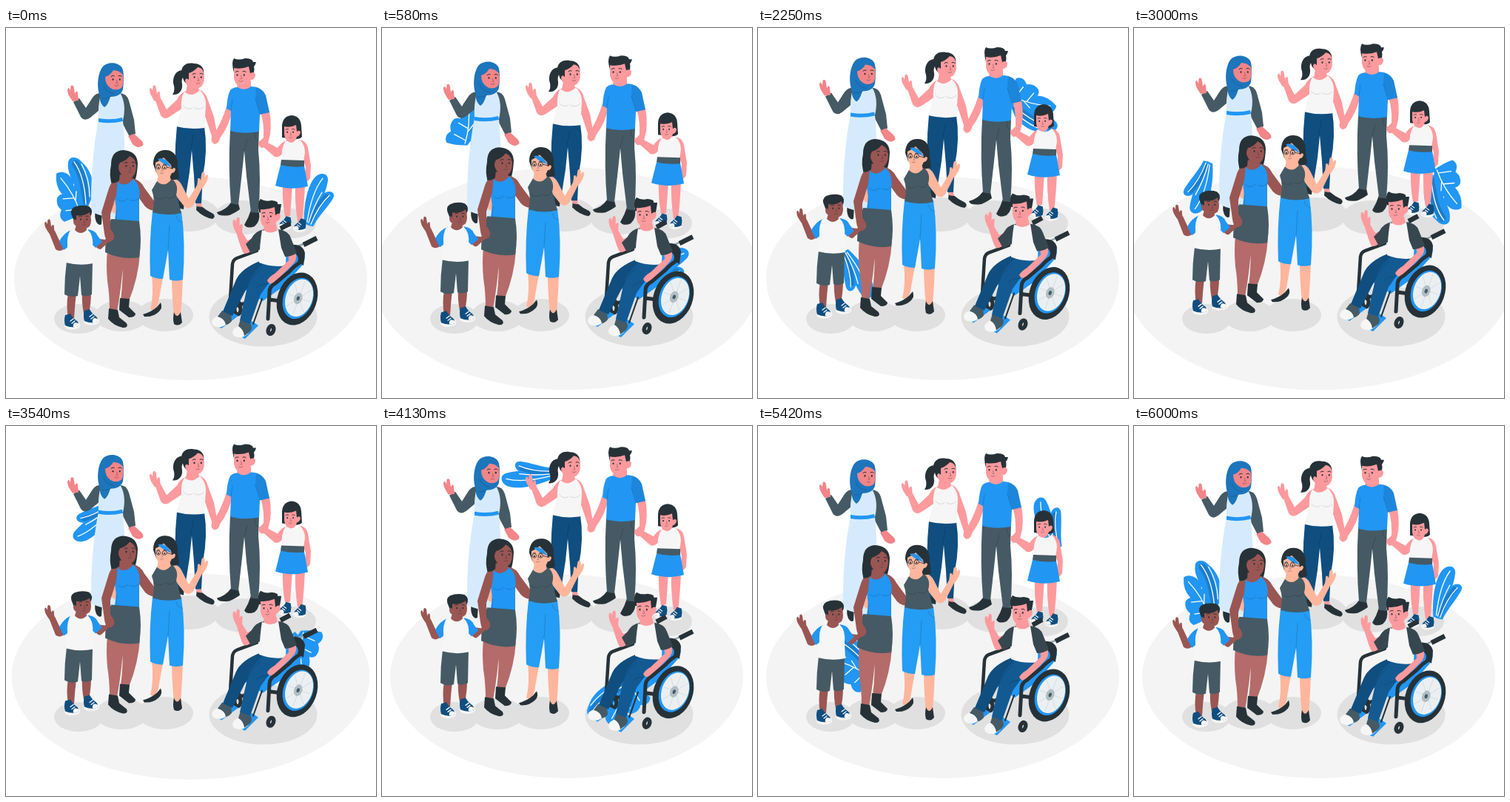
Animation, 500 px wide and 500 px high, one loop 6040 ms. Source, as an HTML page:

```html
<!DOCTYPE html>
<html lang="en">
<head>
<meta charset="utf-8">
<title>Community</title>
<style>
  html, body { margin: 0; width: 100%; height: 100%; overflow: hidden; background: #fff; }
  svg { display: block; width: 100vw; height: 100vh; }
  .blue { fill: #2196f3; } .sky { fill: #249df4; } .deep { fill: #1d75bb; } .navy { fill: #104e80; } .pale { fill: #d5ebfd; }
  .dark { fill: #263238; } .grey { fill: #455a64; } .slate { fill: #37474f; } .white { fill: #f6f6f6; }
  .rose { fill: #f28588; } .pink { fill: #fd9a9d; } .peach { fill: #ffb69c; }
  .brown { fill: #9a5653; } .leg { fill: #b46b69; } .shade { fill: #e0e0e0; }
  .line { fill: none; stroke: #263238; stroke-linecap: round; stroke-linejoin: round; }
  .vein { fill: none; stroke: #fff; stroke-width: 1.3; stroke-linecap: round; }
  .fold { fill: none; stroke: #000; stroke-opacity: .16; stroke-linecap: round; }
</style>
</head>
<body>
<svg viewBox="0 0 500 500">
  <defs>
    <path id="hand" d="M-5 1C-8 -4 -12 -8 -12 -15C-11 -18 -9 -17 -8 -13L-7.500 -19C-6 -22 -3 -20 -3 -16L-2 -9C-1 -13 2 -13 2 -10C2 -6 3 -4 3 0Z"/>
    <g id="face" stroke="#263238" fill="none" stroke-linecap="round">
      <path stroke-width="1" d="M-7 -5.500q2.200 -2 4.200 -.8M3 -6.300q2.500 -1.200 4.300 .6"/>
      <path stroke-width="2.100" d="M-4.500 -1.800v.5M4.800 -1.800v.5"/>
      <path stroke-width=".8" stroke-opacity=".5" d="M.5 -.5l1.200 4l-1.800 .2M-2 6.800q2.500 1.600 5 -.4"/>
    </g>
    <g id="shoe">
      <path class="white" d="M-10 7Q-9 3 -4 2L10 3Q13 9 8 11Q-2 15 -9 10Z"/>
      <path class="navy" d="M-9 -7L-2 -9Q1 -3 7 1Q10 4 9 8Q0 11 -9 7Q-11 0 -9 -7Z"/>
      <path class="white" d="M4 3Q10 3 10 7Q7 10 2 9Q1 5 4 3Z"/>
      <path class="vein" stroke-width=".8" d="M-2 1l4 -3M0 4l4 -3"/>
    </g>
  </defs>

  <ellipse id="floor" rx="238.500" ry="137.500" fill="#f4f4f4"/>
  <g class="shade">
    <ellipse cx="247" cy="252" rx="41" ry="23"/>
    <ellipse cx="320" cy="256" rx="39" ry="23"/>
    <ellipse cx="386" cy="264" rx="33" ry="20"/>
    <ellipse cx="98" cy="393" rx="33" ry="20"/>
    <ellipse cx="156" cy="389" rx="36" ry="21"/>
    <ellipse cx="215" cy="388" rx="38" ry="22"/>
    <ellipse cx="347.500" cy="390" rx="73" ry="40.500"/>
  </g>

  <g id="plants">
    <path class="blue" d="M84 183C84 173 96 173 102 181C113 190 120 206 118 225L110 244L98 240C97 226 94 216 89 205C85 196 83 190 84 183Z"/>
    <path class="fold" stroke-width="10" d="M94 184Q107 203 107 234"/>
    <path class="vein" d="M92 181Q106 200 108 238M102 184Q113 204 113 228"/>
    <path class="blue" d="M68 197C75 192 85 196 90 205Q92 209 91 213Q99 214 102 224Q105 236 104 249Q92 258 79 262Q70 257 75 246Q67 240 69 230Q72 225 76 225Q66 214 68 197Z"/>
    <path class="vein" d="M74 203Q92 224 100 249M94 234L95 221M91 230L77 231M98 245L81 247"/>
    <path class="blue" d="M403 264C402 243 406 215 417 202C424 194 436 195 435 206C432 226 420 245 412 267Z"/>
    <path class="blue" d="M407 266C408 250 418 230 430 223C438 218 446 222 442 230C434 243 424 252 415 268Z"/>
    <path class="fold" stroke-width="7" d="M412 260Q420 240 433 228"/>
    <path class="vein" d="M428 203Q413 222 407 262M437 226Q422 240 412 265M427 222Q416 240 409 263"/>
  </g>

  <!-- woman in a long dress -->
  <g class="low">
    <path class="dark" d="M121 247L130 247L129 265Q126 268 122 262Q119 255 121 247Z"/>
    <path class="grey" d="M91 100L99 95L108 108L117 94Q122 87 131 88L132 106L114 121Q106 127 101 120Z"/>
    <use href="#hand" x="95" y="98" class="rose"/>
    <path class="grey" d="M153 88Q163 88 166 98L173 124L175 143L167 147L157 128Z"/>
    <path class="rose" d="M165 146L173 143L183 152Q188 158 183 160Q178 163 171 157Z"/>
    <path class="pale" d="M128 90Q145 84 155 89Q163 104 158 125Q163 180 160 256Q134 258 115 248Q114 180 125 124Q124 104 128 90Z"/>
    <path class="blue" d="M125 122Q143 125 157 121L158 126Q141 130 125 127Z"/>
    <path class="deep" d="M127 92C122 80 124 60 131 52C138 45 152 46 157 54C160 60 159 75 158 83C156 90 149 93 141 93C139 99 137 105 133 107C129 104 126 98 127 92Z"/>
    <path class="rose" d="M134 66Q141 64 145 57Q153 57 158 63Q160 75 156 81Q148 86 141 81Q134 76 134 66Z"/>
    <path class="fold" d="M132 78Q135 87 146 89M130 95Q137 96 142 92"/>
    <use href="#face" x="149" y="71"/>
  </g>

  <!-- woman with ponytail -->
  <g class="high">
    <path class="dark" d="M232 225L242 225L240 245L231 243Z"/>
    <path class="dark" d="M258 237L263 240Q271 247 280 251Q284 255 279 258Q267 256 257 246Z"/>
    <path class="pink" d="M256 232L263 232L265 242L258 241Z"/>
    <path class="pink" d="M244 85Q236 87 231 97L217 110L209 95L202 98L209 118Q214 125 221 120L242 106Z"/>
    <use href="#hand" x="206" y="98" class="pink"/>
    <path class="pink" d="M260 83Q270 86 273 98L281 120L286 147Q288 156 282 157Q277 155 278 146L270 122L262 104Z"/>
    <path class="navy" d="M231 132L268 133Q273 165 266 200L264 237L256 237L254 200L251 165L248 195L242 233L231 236Q226 180 231 132Z"/>
    <path class="fold" d="M250 163L253 144M262 139Q267 140 268 147"/>
    <path class="pink" d="M245 76L260 78L261 90Q252 96 243 87Z"/>
    <path class="white" d="M241 86Q251 95 262 84Q271 93 270 105L268 135Q249 138 230 133L237 110Q236 94 241 86Z"/>
    <path class="fold" stroke-width=".8" d="M240 106Q246 112 252 108M255 108Q262 112 268 106"/>
    <path class="dark" d="M239 57C228 57 224 69 227 78C228 84 227 87 225 90C234 91 239 84 238 76C237 70 238 67 242 64Z"/>
    <path class="dark" d="M237 62C236 50 245 46 254 48C264 48 269 55 267 64L257 60L247 77Q240 74 239 67Z"/>
    <path class="pink" d="M247 61Q255 58 259 53Q266 54 267 60Q270 72 264 79Q257 85 249 78Q243 79 242 71Q243 66 247 70Z"/>
    <use href="#face" x="259" y="68"/>
  </g>

  <!-- tall man -->
  <g class="high">
    <path class="dark" d="M304 236L314 237L316 245Q311 249 302 253Q286 255 285 249Q297 246 304 236Z"/>
    <path class="dark" d="M331 246L342 249Q344 261 336 268Q326 272 322 266Q328 256 331 246Z"/>
    <path class="pink" d="M298 106L306 110Q302 132 289 149Q288 157 281 156Q275 153 279 147Q291 129 298 106Z"/>
    <path class="pink" d="M344 113L356 112Q360 136 355 152Q353 162 345 162Q339 158 344 152L348 148Q349 130 344 113Z"/>
    <path class="grey" d="M303 137L342 138L341 165Q345 205 341 250L331 249L325 200L322 166L319 195L314 239L304 237Q300 190 303 137Z"/>
    <path class="fold" d="M322 166L326 151M336 142Q336 151 341 153"/>
    <path class="pink" d="M313 70L331 72L331 83Q321 89 312 82Z"/>
    <path class="blue" d="M303 84Q307 80 313 80Q322 86 331 79Q345 79 351 91L356 114L343 117L342 140Q320 144 303 139L304 112L298 109Q299 92 303 84Z"/>
    <path class="fold" d="M343 116L337 96M304 112L306 97"/>
    <path d="M338 80Q348 82 351 91L356 114L344 117L337 96Z" opacity=".1"/>
    <path class="dark" d="M308 60Q304 46 308 41Q314 44 323 41Q333 41 334 46L338 46Q337 50 335 52Q337 60 331 68L324 64Z"/>
    <path class="pink" d="M308 54Q318 56 328 52L330 61Q337 58 337 64Q336 70 331 70Q329 80 319 80Q310 78 308 68Z"/>
    <use href="#face" x="317" y="65"/>
  </g>

  <!-- girl in a skirt -->
  <g class="high">
    <path class="pink" d="M374 210L387 212L384 254L377 255Q373 232 374 210ZM391 212L404 211Q403 238 400 262L394 261Q390 236 391 212Z"/>
    <use href="#shoe" transform="translate(377 262) scale(-.85 .85)"/>
    <use href="#shoe" transform="translate(397 265) scale(-.85 .85)"/>
    <path class="pink" d="M381 151Q372 154 367 162L352 154Q346 149 341 154Q340 160 348 161L363 174Q369 176 375 168Z"/>
    <path class="pink" d="M396 151Q406 152 408 162L412 186L411 203Q407 210 403 206L405 188L399 170Z"/>
    <path class="white" d="M378 152Q388 159 397 151Q404 158 404 168L402 181L373 179Q371 163 378 152Z"/>
    <path class="blue" d="M371 185L403 186L408 214Q386 220 364 213Z"/>
    <path class="grey" d="M372 178L403 179L403 187Q386 189 371 185Z"/>
    <path class="dark" d="M373 132Q374 119 386 118Q398 119 399 132L400 147Q396 151 388 150L373 148Z"/>
    <path class="pink" d="M376 133Q384 135 392 131L393 140Q397 137 398 141Q397 146 393 147Q391 155 385 155Q377 153 376 144Z"/>
    <use href="#face" transform="translate(384 142) scale(.85)"/>
  </g>

  <!-- man in wheelchair -->
  <g class="low">
    <g class="line">
      <path stroke="#90a4ae" stroke-width="2.500" d="M382 300L404 291M363 277L373 271"/>
      <path stroke-width="6.500" d="M402 293L420 284M371 271L384 264" stroke-linecap="butt"/>
      <ellipse cx="323" cy="357" rx="9" ry="17" stroke-width="5" transform="rotate(20 323 357)"/>
      <ellipse cx="313" cy="380" rx="4" ry="7" stroke-width="5"/>
    </g>
    <path class="blue" d="M383 294L402 302Q407 311 400 321L374 350L347 369L318 350L340 320Z"/>
    <path class="dark" d="M384 293Q401 291 404 304L402 321L394 316Q398 306 384 302Z"/>
    <path class="blue" d="M279 396L303 383L314 389L291 406ZM308 413L332 396L341 402L323 420Z"/>
    <path class="line" stroke="#90a4ae" stroke-width="2" d="M346 366L334 400"/>
    <path class="line" stroke-width="4.500" d="M339 301L312 311Q307 313 306 319L303 367L316 377"/>
    <path class="white" d="M278 397Q279 391 288 389L302 394Q300 401 291 404Q278 405 278 397ZM306 411Q307 405 316 402L331 406Q329 414 319 418Q306 419 306 411Z"/>
    <path class="grey" d="M292 382L304 385L305 396Q301 401 297 401Q296 393 286 390ZM317 393L329 398Q335 405 329 411L322 416Q321 407 314 403Z"/>
    <path class="navy" d="M343 315L366 321Q357 338 336 338L323 356L306 389L293 383L311 340Q318 325 343 315Z"/>
    <path d="M349 317L379 318Q380 336 354 346L344 360L330 400L316 395L326 350Q329 334 349 317Z" fill="#135a93"/>
    <path class="fold" d="M326 350Q330 337 344 326M354 346Q344 345 339 351"/>
    <path class="pink" d="M311 276L318 274L326 287L336 284L335 299Q325 307 321 304Q318 300 311 276Z"/>
    <use href="#hand" transform="translate(316 277) rotate(10)" class="pink"/>
    <path class="slate" d="M349 272Q337 274 332 284L324 292L331 305L346 298Z"/>
    <path class="white" d="M346 273Q358 279 370 271Q380 289 378 321Q360 324 342 317Q343 290 346 273Z"/>
    <path class="pink" d="M381 304L391 303Q395 313 386 321L364 343Q356 349 353 341Q357 335 363 332L382 314Z"/>
    <path class="slate" d="M368 272Q382 274 385 284L393 304Q386 309 377 309L372 297Z"/>
    <path class="pink" d="M349 264L365 265L367 273Q357 280 348 273Z"/>
    <path class="dark" d="M342 249Q339 236 344 231Q350 235 359 233Q369 234 367 238L372 238Q370 256 366 259L360 254Z"/>
    <path class="pink" d="M344 245Q353 246 363 242L364 253Q370 248 371 254Q370 260 366 261Q363 271 354 271Q345 269 344 259Z"/>
    <use href="#face" x="353" y="256"/>
    <path class="line" stroke-width="5" d="M399 316Q391 320 383 329L364 345Q356 349 356 357L354 393M356 367L379 370"/>
    <ellipse class="line" cx="358" cy="408" rx="3.500" ry="5.500" stroke-width="5.500" transform="rotate(20 358 408)"/>
    <g transform="translate(393.500 366) rotate(20)">
      <ellipse class="dark" rx="26.500" ry="36.500"/>
      <ellipse cx="1" cy="-1" rx="20" ry="28.500" class="blue"/>
      <ellipse cx="2" cy="-2" rx="18" ry="26" fill="#eceff1"/>
      <path d="M-14 -2H18M2 -26V22M-10 -18L14 14M-10 14L14 -18" stroke="#cfd8dc" stroke-width=".7"/>
      <ellipse cx="1" cy="-1" rx="5.500" ry="8" fill="#b0bec5"/>
      <ellipse cx="1" cy="-1" rx="2" ry="3" class="grey"/>
    </g>
  </g>

  <!-- two women -->
  <g class="high">
    <path class="peach" d="M150 232Q142 236 142 245Q145 253 152 250Z"/>
    <path class="leg" d="M137 300L159 306Q157 345 150 383L140 382Q140 360 137 342Q135 320 137 300ZM157 306L181 304Q179 337 166 369L155 368Q159 337 157 306Z"/>
    <path class="dark" d="M139 379L151 381L153 391L163 399Q166 405 158 405Q145 402 138 393ZM154 365L167 366L166 377L175 386Q175 391 166 391L153 381Z"/>
    <path class="dark" d="M142 185Q142 166 158 165Q177 166 178 183Q177 204 172 210L143 211Q139 199 142 185Z"/>
    <path class="brown" d="M170 203Q182 205 187 216L201 235L201 247Q190 246 185 237L177 226Z"/>
    <path class="brown" d="M153 198L169 200L173 208Q161 220 149 208Z"/>
    <path class="blue" d="M149 206Q160 218 172 204Q183 213 180 232L180 263Q158 266 147 259Q151 240 145 225Z"/>
    <path class="grey" d="M142 258L180 261Q184 286 180 310Q157 314 134 303Q134 278 142 258Z"/>
    <path class="fold" d="M151 232Q158 237 164 231M167 232Q174 236 180 230M150 246Q148 254 149 258"/>
    <path class="brown" d="M151 205Q142 205 138 220L129 249L133 278Q134 288 141 289Q148 286 145 277L141 271L141 252L149 226Z"/>
    <path class="dark" d="M142 190L155 184L153 206Q147 211 142 209Z"/>
    <path class="brown" d="M154 182Q163 179 167 173Q175 176 176 186Q176 200 168 203Q158 204 154 195Q150 188 154 182Z"/>
    <use href="#face" x="167" y="188"/>

    <path class="peach" d="M197 334L212 337L207 365Q206 376 200 382L195 380Q200 360 197 334ZM224 338L239 338Q238 365 236 390L227 390Q224 360 224 338Z"/>
    <path class="dark" d="M185 387Q196 384 204 377L209 371Q212 378 207 383Q199 391 187 390ZM227 384Q231 394 236 384L238 398Q233 404 227 400Q225 393 227 384Z"/>
    <path class="peach" d="M224 203Q234 204 238 213L247 231L259 211L266 214L253 240Q246 247 240 240L226 222Z"/>
    <use href="#hand" transform="translate(261 215) scale(-1 1)" class="peach"/>
    <path class="sky" d="M198 248L237 248Q243 290 239 340Q230 343 221 340L219 300L212 339Q202 339 195 335Q193 290 198 248Z"/>
    <path class="fold" d="M219 300L221 267M230 254Q232 262 239 263"/>
    <path class="dark" d="M199 184C199 171 206 164 217 165C229 166 233 177 232 187L234 203Q226 207 218 205L203 195Z"/>
    <path class="peach" d="M206 197L221 198L223 206Q214 217 204 209Z"/>
    <path class="grey" d="M204 207Q214 217 224 204Q234 211 230 225L237 250Q217 255 198 249Q202 232 197 219Z"/>
    <path class="fold" d="M202 229Q208 234 214 229M217 229Q224 233 229 226"/>
    <path class="peach" d="M202 182Q210 178 213 175L223 185L224 191Q228 187 229 191Q228 196 224 196Q221 205 212 204Q201 201 202 182Z"/>
    <path class="blue" d="M205 177Q211 175 217 179L224 188Q213 185 205 177Z"/>
    <use href="#face" transform="translate(210 190) scale(.9)"/>
    <path class="line" stroke="#455a64" stroke-width=".8" d="M203 188a2.800 2.800 0 1 0 5.600 0a2.800 2.800 0 1 0 -5.600 0M211 188a3.200 2.800 0 1 0 6.400 0a3.200 2.800 0 1 0 -6.400 0M217.400 188L225 190"/>
  </g>

  <!-- boy -->
  <g class="high">
    <path class="brown" d="M84 358L95 358Q93 375 92 392L84 392Q81 375 84 358ZM103 357L115 357Q115 372 112 385L105 386Q102 370 103 357Z"/>
    <use href="#shoe" x="89" y="395"/>
    <use href="#shoe" x="115" y="389"/>
    <path class="brown" d="M58 276L66 274L73 289L81 286L80 297Q73 304 67 299Z"/>
    <use href="#hand" transform="translate(63 277) scale(.9)" class="brown"/>
    <path class="brown" d="M118 288L126 285L134 286Q138 277 146 279Q148 287 139 289L128 299Q122 300 118 288Z"/>
    <path class="blue" d="M88 273Q79 276 72 288L78 300L87 294ZM110 272Q121 273 124 281L130 289L121 297L112 288Z"/>
    <path class="grey" d="M82 315L117 315L116 360Q108 364 102 361L100 335L97 362Q87 365 79 360Q79 337 82 315Z"/>
    <path class="white" d="M87 273Q98 279 110 272Q119 280 117 297L118 318Q100 322 81 317L83 294Q82 282 87 273Z"/>
    <path class="brown" d="M95 266L108 267L109 273Q101 281 93 273Z"/>
    <path class="dark" d="M90 256Q85 246 92 242Q102 238 112 241Q119 246 114 255L96 258L93 264Z"/>
    <path class="brown" d="M95 253Q104 255 113 249Q117 261 113 268Q105 275 97 268Q91 267 91 261Q92 256 95 260Z"/>
    <use href="#face" transform="translate(105 260) scale(.9)"/>
  </g>
</svg>
<script>
  const LOOP = 6040;
  const $ = s => document.querySelectorAll(s);
  const [floor, plants] = $('#floor, #plants');
  const shift = (sel, y) => $(sel).forEach(g => g.setAttribute('transform', `translate(0 ${y})`));

  function draw() {
    const t = performance.now() % LOOP / LOOP;
    const rise = 1 - Math.abs(1 - 2 * t);
    // double heartbeat: peaks at 10% and 50% of the loop
    const beat = Math.max(0, t < .1 ? t * 10 : (.3 - t) * 5, 1 - Math.abs(t - .5) * 10);
    floor.setAttribute('transform', `translate(249.5 338.5) scale(${1 + .1 * beat})`);
    plants.setAttribute('transform', `rotate(${360 * t} 255 222)`);
    shift('.low', -10 * rise);
    shift('.high', -20 * rise);
    requestAnimationFrame(draw);
  }
  draw();
</script>
</body>
</html>
```
